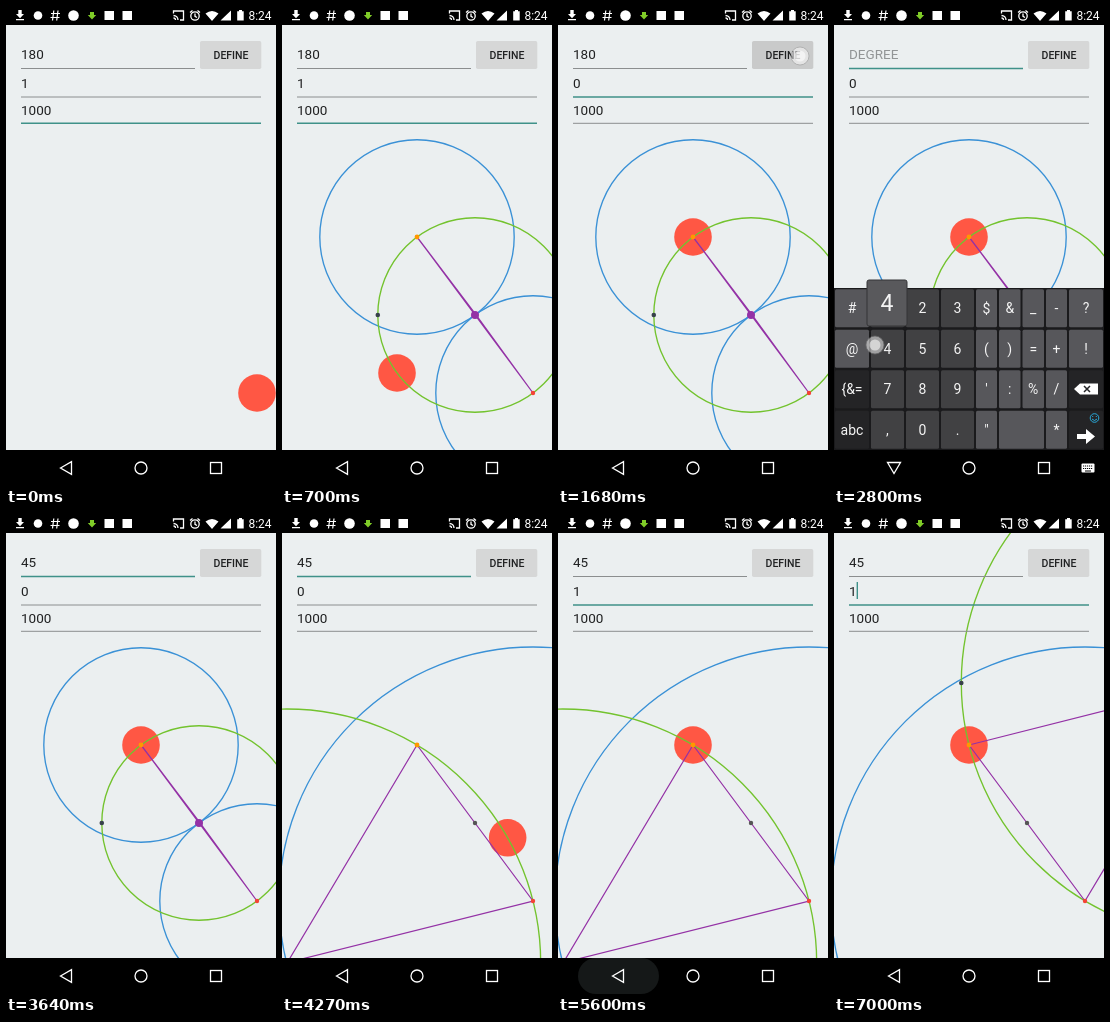
An HTML page for the animation above (7.07 s loop, 270x480 px).

```html
<!DOCTYPE html>
<html lang="en">
<head>
<meta charset="utf-8">
<title>Arc motion demo</title>
<style>
html, body { margin: 0; width: 100%; height: 100%; overflow: hidden; background: #ebeff0; }
svg { display: block; width: 100vw; height: 100vh; font-family: Roboto, "Noto Sans", sans-serif; }
.field { font-size: 13.5px; fill: #202122; }
.thin { fill: none; stroke: #fff; stroke-width: 1.3; }
.lines { fill: none; stroke-width: 1.35; }
.key { font-size: 14px; fill: #f4f4f4; text-anchor: middle; }
</style>
</head>
<body>
<svg id="stage" viewBox="0 0 270 480">
  <rect width="270" height="480" fill="#ebeff0"/>
  <circle id="ball" r="18.8" fill="#ff5744"/>
  <g id="plot">
    <g class="lines">
      <circle id="blueA" cx="135" cy="231" stroke="#3a91d6"/>
      <circle id="blueB" cx="251" cy="387" stroke="#3a91d6"/>
      <circle id="green" stroke="#73c32e"/>
      <path id="wedge" stroke="#9432a6" stroke-width="1.25"/>
    </g>
    <circle id="leftDot" r="2.3" fill="#37414a"/>
    <circle cx="193" cy="309" r="2.2" fill="#555"/>
    <circle id="centerDot" r="4" fill="#9432a6"/>
    <circle cx="135" cy="231" r="2.4" fill="#ff9800"/>
    <circle cx="251" cy="387" r="2.2" fill="#f44336"/>
  </g>

  <g id="fields"></g>
  <rect id="button" x="194" y="35" width="61.3" height="28" rx="1.8"/>
  <text x="225" y="53" font-size="10.5" font-weight="500" text-anchor="middle" fill="#202122">DEFINE</text>
  <rect id="cursor" width="1.4" height="17" fill="#3f9189"/>

  <rect width="270" height="19" fill="#000"/>
  <g fill="#fff">
    <path d="M12.3 4h3.4v4H18l-4 4.2L10 8h2.300zM10 13h8v1.300h-8z"/>
    <circle cx="32" cy="9.500" r="4.300"/>
    <path d="M47.800 4.500l-1.300 10M52 4.500l-1.300 10M45 7.500h9M44.500 11.500h9" stroke="#fff" stroke-width="1.200"/>
    <circle cx="67.500" cy="9.500" r="5.300"/>
    <path d="M84 6h4v3h2.200l-4.200 4.500L81.800 9H84z" fill="#80cc28"/>
    <rect x="98.500" y="5" width="9.500" height="9"/>
    <rect x="116.500" y="5" width="9.500" height="9"/>
    <path class="thin" d="M167.500 7.500V5h10v9H174M167.500 9.500a4.500 4.500 0 0 1 4.500 4.500M167.500 12a2 2 0 0 1 2 2"/>
    <circle class="thin" cx="189" cy="10" r="4.200"/>
    <path class="thin" d="M189 7.500V10.300l2 1.200M184 6.500l2.500-2M194 6.500l-2.500-2"/>
    <path d="M199.500 7.500Q206 2.500 212.500 7.500L206 15zM225 4.500v10H214.500z"/>
    <path d="M233 4h3v1.200h1.700V14.500h-6.500V5.200H233z"/>
    <text x="254" y="14" font-size="12" text-anchor="middle">8:24</text>
  </g>

  <g id="keyboard"></g>
  <rect y="444" width="270" height="36" fill="#000"/>
  <rect id="ripple" x="20" y="444" width="81" height="36" rx="18" fill="#151818"/>
  <path id="back" class="thin"/>
  <circle class="thin" cx="135" cy="462" r="6"/>
  <rect class="thin" x="204.500" y="456.500" width="11" height="11"/>
  <g id="keyIcon">
    <rect x="247.500" y="457.500" width="13" height="9" rx="1" fill="#fff"/>
    <path d="M249 460h10M249 462.500h10" stroke="#000" stroke-dasharray="1.200 .8"/>
    <path d="M251 465h6" stroke="#000"/>
  </g>
  <g id="popup">
    <rect x="-20" y="-23" width="40" height="46" rx="2" fill="#59595c" stroke="#353537"/>
    <text id="popupText" class="key" y="8" style="font-size:23px"></text>
  </g>
  <g id="touch">
    <circle r="9" fill="#fff" opacity=".5" stroke="#888" stroke-width=".8"/>
    <circle r="5.500" fill="#fff" opacity=".55"/>
  </g>
</svg>
<script>
const LOOP = 7070, STEP = 70, MOVE = 1000;
const A = [135, 231], B = [251, 387], MID = [193, 309];
const CHORD = Math.hypot(B[0] - A[0], B[1] - A[1]);
const RUNS = [
  { at: 200, deg: 180, dir: 1 },
  { at: 1740, deg: 180, dir: -1 },
  { at: 3872, deg: 45, dir: -1 },
  { at: 5996, deg: 45, dir: 1 }
];
const DEGREE = [[0, '180'], [2730, ''], [2870, '4'], [3080, '45']];
const SEQUENCE = [[0, '1'], [1330, ''], [1400, '0'], [5250, ''], [5390, '1']];
const FOCUS = [[0, 2], [1260, 1], [2590, 0], [4950, 1]];
const KEYBOARD = [[1260, 1600], [2660, 3500], [5040, 5560]];
const BACK = [[1530, 1670], [3430, 3640], [5530, 5740]];
const PRESS = [[70, 205], [1670, 1800], [3700, 3900], [5870, 6000]];
const KEYS = [
  [1330, 1460, '0', 88, 423], [2780, 2900, '4', 53, 342],
  [3000, 3120, '5', 88, 342], [5320, 5420, '1', 53, 302]
];
const TOUCHES = [
  ...PRESS.map(([from, to]) => [from, to, 242, 50]),
  ...BACK.map(([from]) => [from, from + 60, 60, 462]),
  ...KEYS.map(([from, to, , x, y]) => [from, to - 30, x - 12, y - 3]),
  [1200, 1280, 100, 78], [2590, 2680, 100, 49], [4950, 5050, 100, 78]
];

const el = id => document.getElementById(id);
const set = (id, attrs) => {
  for (const name in attrs) el(id).setAttribute(name, attrs[name]);
};
const show = (id, on) => { el(id).style.display = on ? '' : 'none'; };
const active = (spans, t) => spans.find(s => t >= s[0] && t < s[1]);
const latest = (list, t) => list.filter(e => t >= e[0]).pop()[1];

const FIELD_ROWS = [[53, 62.500, 189], [82, 91, 255], [108.500, 117.300, 255]];
el('fields').innerHTML = FIELD_ROWS.map(([base, line, right], i) =>
  `<text id="text${i}" class="field" x="15" y="${base}"></text>
   <path id="line${i}" d="M15 ${line}H${right}"/>`).join('');

function buildKeyboard() {
  const edges = [0, 36, 71, 106, 141, 164, 187.500, 211, 234, 270];
  const rows = ['# 1 2 3 $ & _ - ?', '@ 4 5 6 ( ) = + !', "{&= 7 8 9 ' : % / BACK", 'abc , 0 . " SPACE SKIP * ENTER'];
  let out = '<rect y="282" width="270" height="162" fill="#1a1a1c"/>';
  rows.forEach((row, r) => row.split(' ').forEach((label, c) => {
    if (label === 'SKIP') return;
    const x = edges[c], end = edges[label === 'SPACE' ? c + 2 : c + 1], y = 282 + r * 40.500;
    const special = r > 1 && (c === 0 || c === 8);
    const fill = special ? '#242426' : c > 0 && c < 4 ? '#414143' : '#57575b';
    out += `<rect x="${x + 1}" y="${y + 1.200}" width="${end - x - 2}" height="38" rx="1.500" fill="${fill}"/>`;
    if (label.length < 4) {
      const text = label.replace('&', '&amp;');
      out += `<text class="key" x="${(x + end) / 2}" y="${y + 25}">${text}</text>`;
    }
  }));
  out += '<path d="M240 383l6-5.500h18v11h-18z" fill="#fff"/><path d="M250 380l6 6m0-6l-6 6" stroke="#242426" stroke-width="1.500"/>'
    + '<path d="M243 428h9v-5l9 7.500-9 7.500v-5h-9z" fill="#fff"/>'
    + '<g fill="none" stroke="#28a8d8"><circle cx="260.500" cy="412" r="4.300"/><path d="M258 413q2.500 3 5 0M258.700 410v1M262.300 410v1"/></g>';
  el('keyboard').innerHTML = out;
}

function drawPlot(t) {
  const run = RUNS.filter(r => t >= r.at).pop();
  show('plot', run);
  if (!run) return set('ball', { cx: B[0], cy: B[1] });
  const half = run.deg * Math.PI / 360;
  const radius = CHORD / 2 / Math.sin(half);
  const offset = run.dir * CHORD / 2 / Math.tan(half);
  const cx = MID[0] + offset * (B[1] - A[1]) / CHORD;
  const cy = MID[1] - offset * (B[0] - A[0]) / CHORD;
  const p = Math.min(1, (t - run.at) / MOVE);
  const eased = (1 - Math.cos(Math.PI * p)) / 2;
  const angle = Math.atan2(B[1] - cy, B[0] - cx) + run.dir * 2 * half * eased;
  set('ball', { cx: cx + radius * Math.cos(angle), cy: cy + radius * Math.sin(angle) });
  set('blueA', { r: radius });
  set('blueB', { r: radius });
  set('green', { cx, cy, r: radius });
  set('leftDot', { cx: cx - radius, cy });
  set('centerDot', { cx, cy });
  set('wedge', { d: `M${A}L${cx + .7} ${cy - .5}L${B}Z` });
}

function drawForm(t) {
  const values = [latest(DEGREE, t), latest(SEQUENCE, t), '1000'];
  const focus = latest(FOCUS, t);
  values.forEach((value, i) => {
    el('text' + i).textContent = value || (i ? '' : 'DEGREE');
    el('text' + i).style.fill = value ? '' : '#929596';
    set('line' + i, {
      stroke: i === focus ? '#3f9189' : '#8b8e8f',
      'stroke-width': i === focus ? 1.6 : 1
    });
  });
  show('cursor', t > 900 && (t + 180) % 1000 < 450);
  set('cursor', { x: 15 + values[focus].length * 7.600, y: FIELD_ROWS[focus][0] - 14 });
  set('button', { fill: active(PRESS, t) ? '#c9caca' : '#d6d7d7' });
}

function drawInput(t) {
  const open = active(KEYBOARD, t), key = active(KEYS, t), touch = active(TOUCHES, t);
  show('keyboard', open);
  show('keyIcon', open);
  show('ripple', active(BACK, t));
  set('back', { d: open ? 'M53.500 456.500h13L60 467.500z' : 'M54.500 462l11-6.300v12.600z' });
  show('popup', key);
  if (key) {
    set('popup', { transform: `translate(${key[3]} ${key[4] - 45})` });
    el('popupText').textContent = key[2];
  }
  show('touch', touch);
  if (touch) set('touch', { transform: `translate(${touch[2]} ${touch[3]})` });
}

const began = performance.now();
function render() {
  const elapsed = Math.max(0, performance.now() - began) % LOOP;
  const t = Math.floor(elapsed / STEP) * STEP;
  drawPlot(t);
  drawForm(t);
  drawInput(t);
  requestAnimationFrame(render);
}
buildKeyboard();
render();
</script>
</body>
</html>
```
